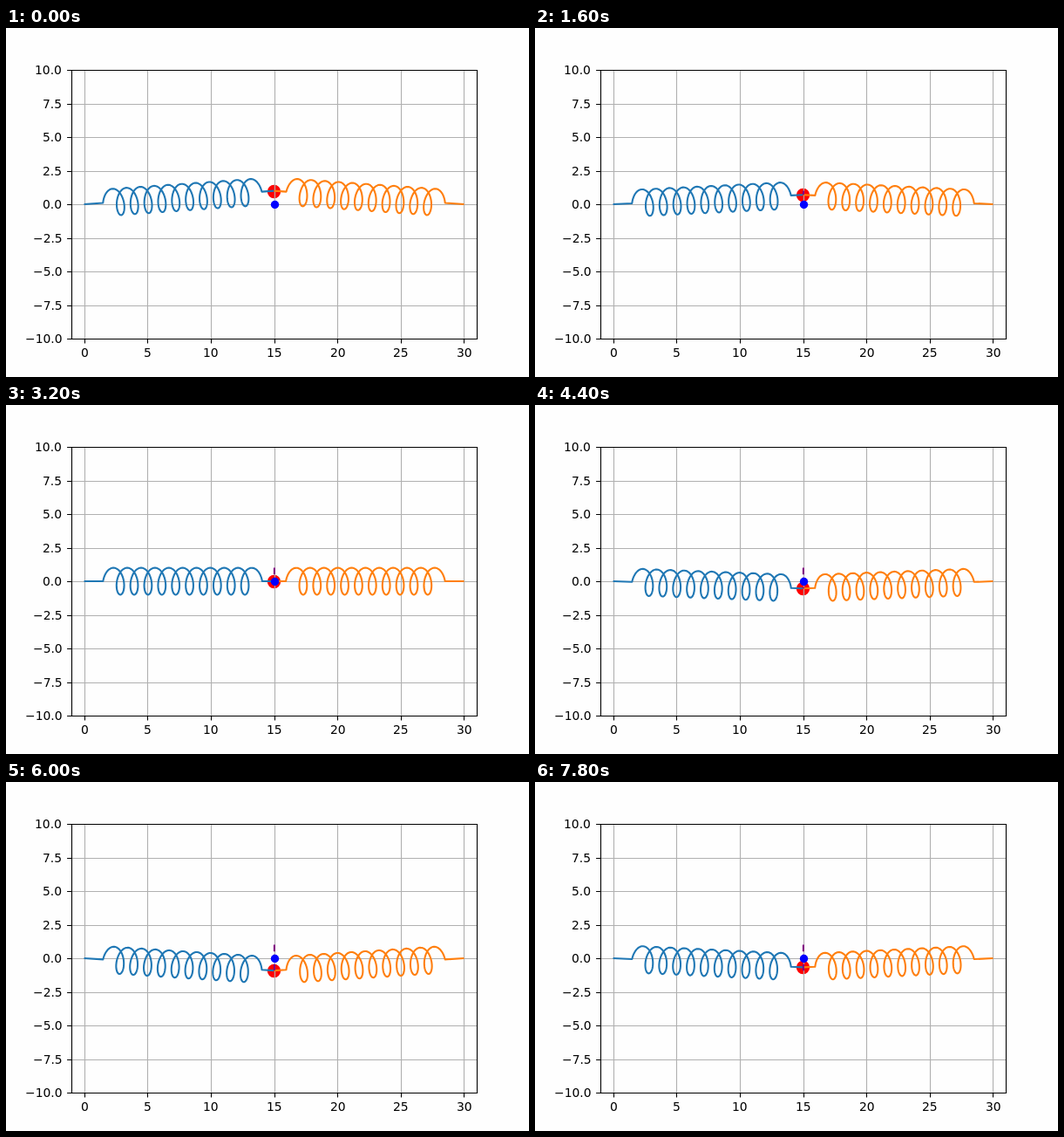
An HTML page for the animation above (8 s loop, 600 by 400 pixels).

```html
<!DOCTYPE html>
<html lang="en">
<head>
<meta charset="utf-8">
<title>Mass between two springs</title>
<style>
  html, body { margin: 0; width: 100%; height: 100%; overflow: hidden; background: #fefefe; }
  svg { display: block; width: 100%; height: 100%; }
  text { font: 13.89px "DejaVu Sans", sans-serif; fill: #000; }
  path { fill: none; }
  .grid { stroke: #b0b0b0; stroke-width: 1.1; }
  .axis { stroke: #000; stroke-width: 1.1; }
  .spring { stroke-width: 2.08; stroke-linejoin: round; }
  #left { stroke: #1f77b4; }
  #right { stroke: #ff7f0e; }
  #trail { stroke: #800080; stroke-width: 2.08; stroke-dasharray: 7.7 3.33; }
</style>
</head>
<body>
<svg viewBox="0 0 600 400">
  <circle id="mass" cx="307.5" r="7.7" fill="#f00"/>
  <path class="grid" id="grid"/>
  <g id="labels"></g>
  <path class="spring" id="left"/>
  <path class="spring" id="right"/>
  <path id="trail"/>
  <circle cx="308.5" cy="202.5" r="4.7" fill="#00f"/>
  <path class="axis" id="axis"/>
</svg>
<script>
const STEP = 200, STEPS = 40;
const FREQ = 0.1, DAMPING = 0.0025;
const UNIT_X = 465 / 32, UNIT_Y = 15.4;
const LEFT_X = 75 + UNIT_X, MID_X = 307.5, RIGHT_X = 540 - UNIT_X, ZERO_Y = 202;
const TURNS = 10.5, LEAD = 1.5 * UNIT_X;
const PITCH = 4 * Math.PI * UNIT_X / (TURNS + 1);

const el = id => document.getElementById(id);
const setPath = (id, d) => el(id).setAttribute("d", d);
const snap = v => Math.floor(v + 0.5) + 0.5;
const polyline = points => "M" + points.map(p => p.map(v => v.toFixed(2)).join(" ")).join("L");

// Places text on whole pixels; align is the share of its width left of x.
function label(value, x, y, align) {
  const node = document.createElementNS("http://www.w3.org/2000/svg", "text");
  node.textContent = value.replace("-", "\u2212");
  el("labels").append(node);
  node.setAttribute("x", Math.round(x - align * node.getComputedTextLength()));
  node.setAttribute("y", Math.round(y));
}

function buildAxes() {
  let grid = "", axis = "M75.5 48.5H540.5V356.5H75.5Z";
  for (let v = 0; v <= 30; v += 5) {
    const x = LEFT_X + v * UNIT_X;
    grid += `M${snap(x)} 48V356`;
    axis += `M${snap(x)} 356v5.4`;
    label(String(v), x + 0.45, 377, 0.5);
  }
  for (let v = -10; v <= 10; v += 2.5) {
    const y = ZERO_Y - v * UNIT_Y;
    grid += `M75 ${snap(y)}H540`;
    axis += `M75 ${snap(y)}h-4.9`;
    label(v.toFixed(1), 64.4, y + 5.2, 1);
  }
  setPath("grid", grid);
  setPath("axis", axis);
}

// Coil from a fixed end at x towards the mass; side is 1 to the right, -1 to the left.
function spring(x, massY, side) {
  const dx = MID_X - x, dy = massY - ZERO_Y;
  const length = Math.hypot(dx, dy);
  const c = dx / length, s = dy / length;
  const points = [[x, ZERO_Y]];
  const count = 420;
  for (let i = 0; i <= count; i++) {
    const turn = TURNS * i / count, a = turn * 2 * Math.PI;
    const along = LEAD + PITCH * (turn + (1 - Math.cos(a)) / 2);
    const across = -side * UNIT_Y * Math.sin(a);
    points.push([x + along * c - across * s, ZERO_Y + along * s + across * c]);
  }
  points.push([MID_X, massY]);
  return polyline(points);
}

function massY(n) {
  const a = FREQ * n;
  const swing = Math.cos(a) + DAMPING / FREQ * Math.sin(a);
  return ZERO_Y - UNIT_Y * Math.exp(-DAMPING * n) * swing;
}

function draw(n) {
  const y = massY(n);
  setPath("left", spring(LEFT_X, y, 1));
  setPath("right", spring(RIGHT_X, y, -1));
  setPath("trail", polyline(Array.from({ length: n + 1 }, (_, i) => [MID_X + 0.4, massY(i)])));
  el("mass").setAttribute("cy", snap(y));
}

buildAxes();
draw(0);
const start = performance.now();
let shown = 0;
function tick() {
  const n = Math.floor((performance.now() - start) / STEP) % STEPS;
  if (n !== shown) draw(shown = n);
  requestAnimationFrame(tick);
}
requestAnimationFrame(tick);
</script>
</body>
</html>
```
